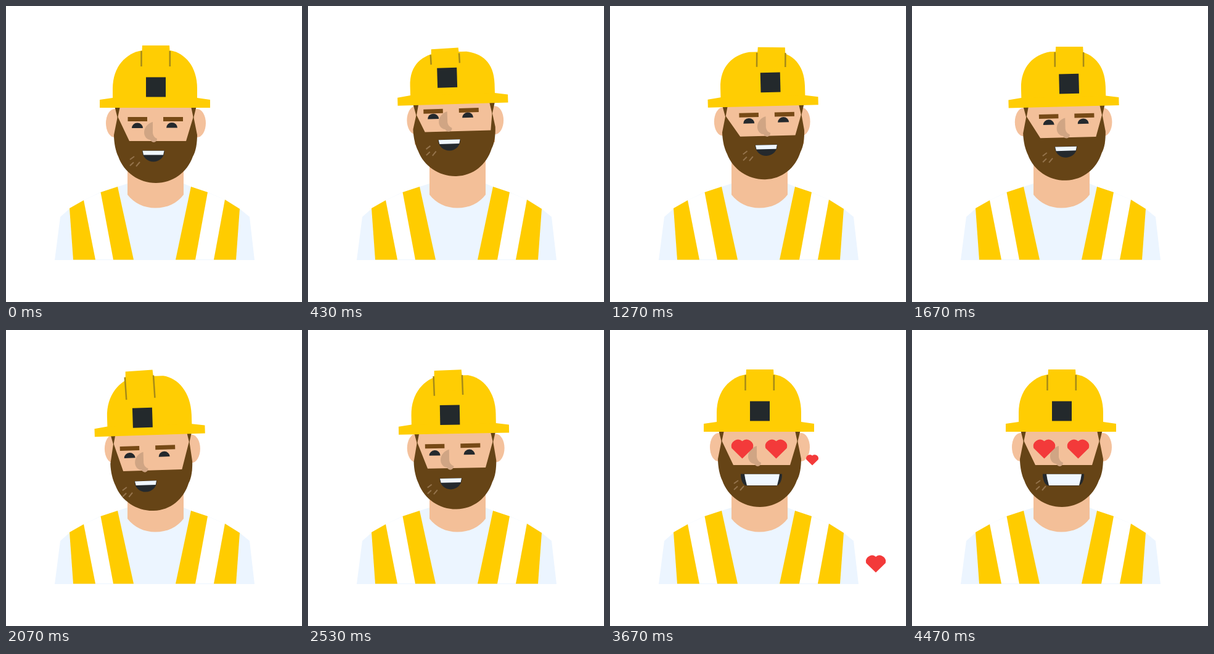
These frames come from a looping animation (480x480 px, 4510 ms). An HTML page:

```html
<!DOCTYPE html>
<html lang="en">
<head>
<meta charset="utf-8">
<title>Builder in love</title>
<style>
  html, body { margin: 0; width: 100%; height: 100%; overflow: hidden; background: #fff; }
  svg { display: block; width: 100vw; height: 100vh; }
</style>
</head>
<body>
<svg viewBox="0 0 480 480">
  <defs>
    <path id="heart" d="M0 42L-43 0A27 27 0 0 1 0-28A27 27 0 0 1 43 0Z" fill="#f33a3a"/>
    <path id="eye" d="M-9 4A9 8.500 0 0 1 9 4Z" fill="#24292d"/>
  </defs>

  <path d="M79 412L88 342L104 328L126 315L153 302L181 293L197 288H288L300 293L327 302L355 314L379 329L395 342L403 412Z" fill="#ecf5ff"/>
  <g fill="#fff">
    <path d="M126 315L154 302L175 411H144Z"/>
    <path d="M326 302L355 314L337 411H307Z"/>
  </g>
  <g fill="#ffcc00">
    <path d="M103 328L126 315L145 411.500H109Z"/>
    <path d="M153.500 302L181 293L207 411.500H174Z"/>
    <path d="M300 293L327 302L307 411.500H275Z"/>
    <path d="M355 314L379 329L373 411.500H337Z"/>
  </g>
  <path d="M197 245V306C208 320 224 327.500 242 327.500C262 327.500 277 320 288 306V245Z" fill="#f3bf98"/>

  <g fill="#f4c19c">
    <ellipse id="earL" cx="176" cy="190" rx="14" ry="23"/>
    <ellipse id="earR" cx="310" cy="190" rx="14" ry="23"/>
  </g>
  <g id="floaters"></g>

  <g id="head">
    <g id="skull">
      <path d="M177 150H307V228H177Z" fill="#f3c09a"/>
      <path d="M175 158H186L181 182ZM299 158H310L304 182Z" fill="#664416"/>
    </g>
    <path id="beard" fill="#664416"/>
    <path id="nose" d="M238 188C230 190 224 197 224 205C224 212 229 217 234 217Q236 221 240 221Q245 220 245 215Q239 213 238 206Z" fill="#d0a584"/>
    <g id="plainEyes">
      <path id="brows" d="M197.500 180H229V187H197.500ZM255 180H287V187H255Z" fill="#774a16"/>
      <g id="eyes">
        <use href="#eye" x="213" y="194"/>
        <use href="#eye" x="269" y="193.500"/>
      </g>
    </g>
    <g id="mouth">
      <path d="M201 249L208 244M201 259L207 253.500M211 260L217 253" stroke="#94734c" stroke-width="2" fill="none"/>
      <path id="lips" fill="#24292d"/>
      <path id="upper" fill="#f0f7ff"/>
      <path id="lower" fill="#f0f7ff"/>
    </g>
    <use id="loveL" href="#heart"/>
    <use id="loveR" href="#heart"/>
    <g id="helmet">
      <path id="dome" fill="#ffcd03"/>
      <path d="M152 152L173 149H310L331 152V165H152Z" fill="#ffcd03"/>
      <g id="ridge">
        <path d="M221 64H265L267 98H219Z" fill="#ffcd03"/>
        <path id="grooves" stroke="#a68a18" stroke-width="2.500" fill="none"/>
      </g>
      <rect id="badge" x="227" y="115.500" width="32" height="32" fill="#23292c"/>
    </g>
  </g>
</svg>
<script>
const LOOP = 4510;
const ids = {};
document.querySelectorAll('[id]').forEach(el => ids[el.id] = el);

const set = (el, name, value) => el.setAttribute(name, value);
const mix = (a, b, u) => a + (b - a) * u;
const ramp = (t, a, b) => Math.max(0, Math.min(1, (t - a) / (b - a)));
const ease = (t, a, b) => { const u = ramp(t, a, b); return u * u * (3 - 2 * u); };
const move = (el, x, y) => set(el, 'transform', `translate(${x} ${y})`);

// Head turns: start time, yaw, pitch, tilt
const TURN = 300;
const turns = [
  [30, -10.6, -16, -1.7],
  [900, 12.5, -8, -1.4],
  [1600, -14, 8.3, -1.8],
  [2400, 0, 0, 0]
];

function poseAt(t) {
  let pose = [0, 0, 0];
  for (const [start, ...goal] of turns) {
    const u = ease(t, start, start + TURN);
    pose = pose.map((v, i) => mix(v, goal[i], u));
  }
  return pose;
}

// Floating hearts: x, y and width at time `at`, velocity per second, birth, end
const burst = (x, y, w, born, end) =>
  ({ x, y, w, vx: (x - 242) * 0.8, vy: (y - 230) * 0.8, at: 3130, born, end });
const hearts = [
  burst(158, 122, 48, 2780, 3540),
  burst(46, 143, 31, 2760, 3500),
  burst(127, 146, 35, 2820, 3480),
  burst(318, 167, 27, 2900, 3460),
  burst(123, 285, 20, 2930, 3520),
  burst(394, 317, 50, 2790, 3600),
  burst(408, 324, 18, 2900, 3500),
  burst(416, 343, 23, 2860, 3560),
  { x: 431, y: 378, w: 36, vx: 52, vy: -59, at: 3670, born: 3122, end: 3730 },
  { x: 328, y: 210, w: 22, vx: 22, vy: -7, at: 3670, born: 3110, end: 4060 },
  { x: 49, y: 290, w: 24, vx: -8, vy: -6, at: 3900, born: 3740, end: 4060 }
];
for (const h of hearts) {
  h.el = document.createElementNS('http://www.w3.org/2000/svg', 'use');
  set(h.el, 'href', '#heart');
  ids.floaters.append(h.el);
}

function drawHeart(el, x, y, width) {
  set(el, 'transform', `translate(${x} ${y}) scale(${width / 97})`);
  set(el, 'visibility', width > 0 ? 'visible' : 'hidden');
}

function drawHead([yaw, pitch, tilt]) {
  const turn = Math.abs(yaw);
  set(ids.head, 'transform', `rotate(${tilt} 242 175)`);
  move(ids.earL, yaw * 0.35 + turn * 0.2, pitch * 0.3);
  move(ids.earR, yaw * 0.35 - turn * 0.3, pitch * 0.3);
  move(ids.skull, yaw * 0.5, pitch * 0.33);
  move(ids.brows, yaw * 0.95, pitch * 0.87);
  move(ids.eyes, yaw * 0.95, pitch);
  move(ids.nose, yaw * 1.15, pitch * 1.1);
  move(ids.mouth, yaw * 1.05, pitch * 1.15);

  const x = yaw * 0.5, right = x - turn * 0.15;
  const y = pitch * 0.7, top = 179 + pitch * 0.3, cheek = 219 + pitch;
  set(ids.beard, 'd', `M${181 + x} ${top}L${175 + x} ${209 + y}
    C${175 + x} ${222 + y} ${178 + x} ${236 + y} ${182 + x} ${244 + y}
    C${191 + x} ${270 + y} ${216 + x} ${287 + y} ${243 + x} ${287 + y}
    C${270 + x} ${287 + y} ${294 + right} ${270 + y} ${303 + right} ${244 + y}
    C${308 + right} ${236 + y} ${310 + right} ${222 + y} ${310 + right} ${209 + y}
    L${304 + x} ${top}L${292 + yaw * 0.33 - pitch * 0.44} ${cheek}
    L${200 + yaw * 0.89 + pitch * 0.11} ${cheek}Z`);

  move(ids.helmet, yaw * 0.57, pitch * 0.45 + turn * 0.1);
  const crown = 72 - pitch * 0.45 + turn * 0.1;
  set(ids.dome, 'd', `M173 152V134C173 98 195 ${crown + 4} 221 ${crown}
    H266C290 ${crown + 4} 310 98 310 134V152Z`);
  set(ids.ridge, 'transform',
    `translate(${yaw * 1.1} ${turn * 0.08 - pitch * 0.6}) rotate(${yaw * 0.15} 243 80)`);
  const foot = 98 + pitch * 0.8 + turn * 0.35;
  set(ids.grooves, 'd', `M219.500 73V${foot}M265.800 73V${foot}`);
  move(ids.badge, yaw * 0.9, pitch * 0.6);
}

function drawMouth(t) {
  const grin = ease(t, 2730, 3000), shut = ease(t, 2950, 3300);
  const l = mix(221, 212, grin), r = mix(257, 279, grin);
  const y = mix(234.5, 233.5, grin), corner = mix(18, 10, grin);
  set(ids.lips, 'd', `M${l} ${y}H${r}C${r} 246 ${r - corner / 2} 252.500 ${r - corner} 252.500
    H${l + corner}C${l + corner / 2} 252.500 ${l} 246 ${l} ${y}Z`);
  const a = l + mix(0.5, 6, grin), b = r - mix(0.5, 4, grin);
  const mid = mix(241.5, 242.3, grin);
  set(ids.upper, 'd', `M${a} ${y + 0.3}H${b}L${b - 1.5} ${mid}H${a + 1.5}Z`);
  const gap = mix(252, mix(243.8, 242, shut), ease(t, 2850, 3080));
  set(ids.lower, 'd', `M${a + 1.5} ${gap}H${b - 1.5}L${b - 4} 252H${a + 4}Z`);
  set(ids.lower, 'visibility', gap < 251 ? 'visible' : 'hidden');
}

function draw(t) {
  drawHead(poseAt(t));
  drawMouth(t);
  const love = 39 * (1.2 * ease(t, 2720, 2950) - 0.2 * ease(t, 2950, 3300));
  drawHeart(ids.loveL, 214.5, 191.5, love);
  drawHeart(ids.loveR, 269.5, 191.5, love);
  set(ids.plainEyes, 'visibility', t > 2820 ? 'hidden' : 'visible');
  for (const h of hearts) {
    const s = (t - h.at) / 1000;
    const size = ramp(t, h.born, h.born + 150) * ramp(h.end - t, 0, 60);
    drawHeart(h.el, h.x + h.vx * s, h.y + h.vy * s, h.w * size);
  }
}

const begin = performance.now();
function tick() {
  draw((performance.now() - begin) % LOOP);
  requestAnimationFrame(tick);
}
tick();
</script>
</body>
</html>
```
